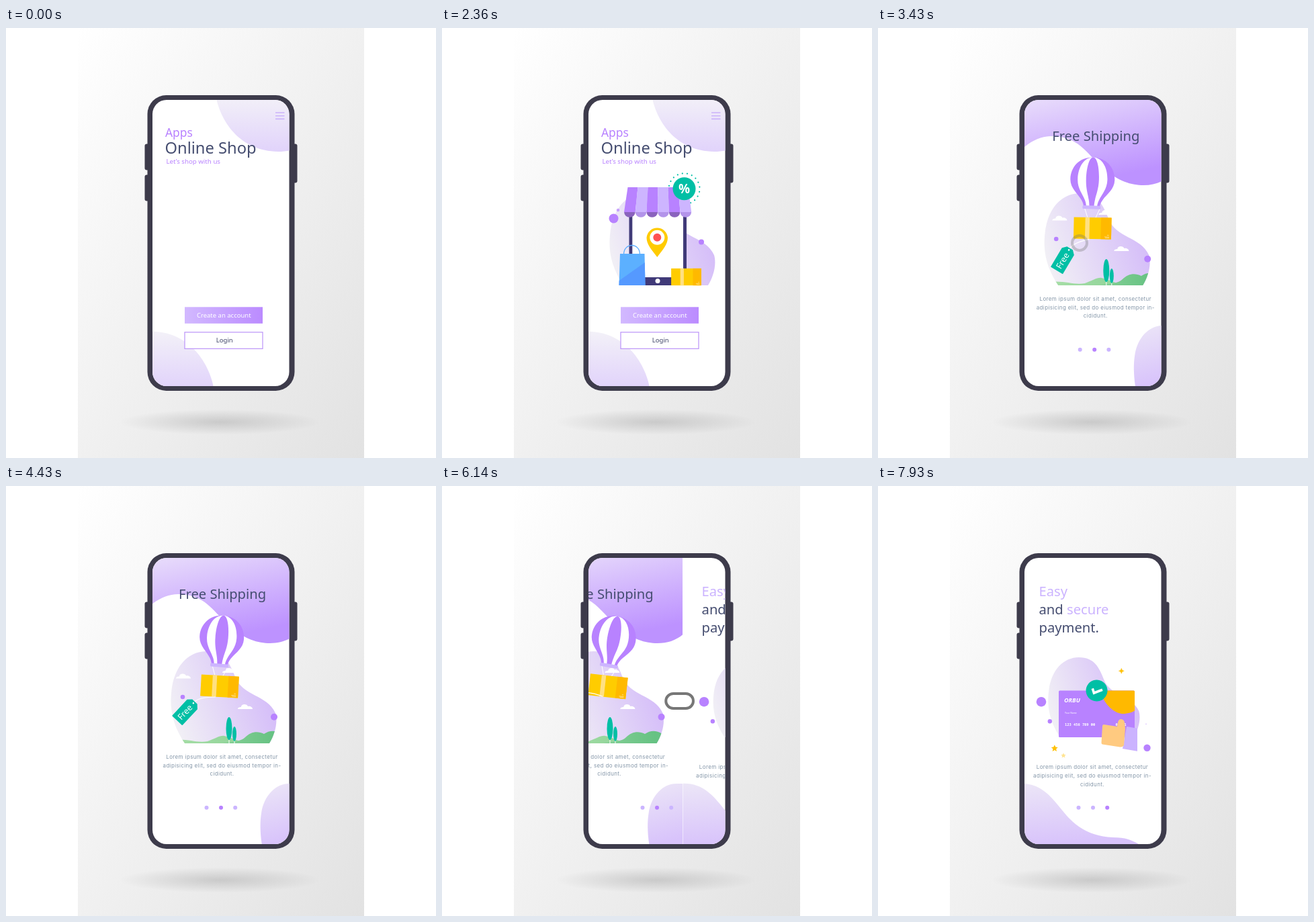
Animation of 640x640 px, one loop 8000 ms. Source, as an HTML page:

```html
<!DOCTYPE html>
<html lang="en">
<head>
<meta charset="utf-8">
<title>Online shop onboarding</title>
<style>
  html, body { margin: 0; width: 100%; height: 100%; overflow: hidden; background: #fff; }
  svg { display: block; width: 100%; height: 100%; }
  text { font-family: "Noto Sans", "Open Sans", sans-serif; }
  .head { font-size: 20.2px; font-weight: 500; fill: #454d70; }
  .soft { fill: #cbb3ff; }
  .small { font-size: 9.5px; font-weight: 500; text-anchor: middle; }
  .lorem text { font: 8px Inter, "Open Sans", sans-serif; letter-spacing: .36px; fill: #8496a8; text-anchor: middle; }
  .purple { fill: #b882ff; }
  .teal { fill: #00bfa5; }
  .white { fill: #fff; }
</style>
</head>
<body>
<svg viewBox="0 0 640 640">
  <defs>
    <linearGradient id="backdrop" x2="1" y2="1"><stop stop-color="#fff"/><stop offset="1" stop-color="#e2e2e2"/></linearGradient>
    <radialGradient id="shade"><stop stop-color="#000" stop-opacity=".14"/><stop offset=".5" stop-color="#000" stop-opacity=".07"/><stop offset="1" stop-color="#000" stop-opacity="0"/></radialGradient>
    <linearGradient id="pale" x2="0" y2="1"><stop stop-color="#f3f1f8"/><stop offset="1" stop-color="#e1d3fb"/></linearGradient>
    <linearGradient id="mid" x2=".15" y2="1"><stop stop-color="#ece6f7"/><stop offset="1" stop-color="#d8c3fb"/></linearGradient>
    <linearGradient id="sky" x2=".35" y2="1"><stop stop-color="#ebe1fb"/><stop offset="1" stop-color="#bd92ff"/></linearGradient>
    <linearGradient id="mist" x1="0" y1=".75" x2="1" y2=".45"><stop stop-color="#f2f1f5"/><stop offset="1" stop-color="#d3baf9"/></linearGradient>
    <linearGradient id="button"><stop stop-color="#d2b9ff"/><stop offset="1" stop-color="#bb8bff"/></linearGradient>
    <linearGradient id="grass"><stop stop-color="#a9dfa8"/><stop offset="1" stop-color="#8fd398"/></linearGradient>
    <linearGradient id="meadow"><stop stop-color="#85cf95"/><stop offset=".6" stop-color="#66c283"/></linearGradient>

    <path id="blob" d="M266 383C252 362 243 338 246 308C249 268 272 246 298 246C325 246 333 264 341 284C352 313 388 310 401 338C405 352 400 370 392 383Z"/>
    <path id="envelope" d="M0-33C20-33 33-18 33 0C33 18 14 25 12 40H-12C-14 25-33 18-33 0C-33-18-20-33 0-33Z"/>
    <path id="cloud" d="M-11 3C-11 0-7 0-6 0C-6-5 3-5 4-1C7-2 11 0 11 3Z" fill="#fff"/>
    <path id="star" d="M0-5L1.5-1.7L5-1.4L2.4 1L3.1 4.6L0 2.7L-3.1 4.6L-2.4 1L-5-1.4L-1.5-1.7Z"/>
    <path id="spark" d="M0-4Q.5-.5 4 0Q.5.5 0 4Q-.5.5-4 0Q-.5-.5 0-4Z" stroke="#ffc107" stroke-width=".5"/>
    <g id="parcel">
      <rect x="-28" y="-16" width="56" height="32" fill="#ffcc00"/>
      <rect x="-11" y="-16" width="6.5" height="32" fill="#ffe082"/>
      <rect x="12.500" y="-16" width="15.500" height="32" fill="#ffb900"/>
      <path d="M18 12.500h7M19 14h6M22 10h2.500" stroke="#ffe9b0" stroke-width=".7"/>
    </g>
    <g id="lorem" class="lorem">
      <text x="321.500" y="405.800">Lorem ipsum dolor sit amet, consectetur</text>
      <text x="321.500" y="418.500">adipisicing elit, sed do eiusmod tempor in-</text>
      <text x="321.500" y="431.200">cididunt.</text>
    </g>
    <clipPath id="screen"><rect x="218" y="107" width="203.500" height="426" rx="21"/></clipPath>
    <clipPath id="page"><rect x="211.500" y="100" width="219" height="440"/></clipPath>
    <clipPath id="inBlob"><use href="#blob"/></clipPath>
    <clipPath id="inCard"><rect x="269" y="304.500" width="113" height="69.500" rx="1.500"/></clipPath>
    <clipPath id="inScene"><rect x="220" y="230" width="166" height="190"/></clipPath>
  </defs>

  <rect width="640" height="640" fill="#fff"/>
  <rect x="107" width="426" height="640" fill="url(#backdrop)"/>
  <ellipse cx="318" cy="586.500" rx="150" ry="19" fill="url(#shade)"/>
  <g fill="#3d3b4b">
    <rect x="206.500" y="172.500" width="10" height="39" rx="3"/>
    <rect x="206.500" y="218.500" width="10" height="39" rx="3"/>
    <rect x="424" y="172.500" width="9.500" height="58" rx="3"/>
    <rect x="210.500" y="100" width="219" height="440" rx="28"/>
  </g>
  <rect x="218" y="107" width="203.500" height="426" rx="21" fill="#fff"/>

  <g clip-path="url(#screen)">
    <g id="home" clip-path="url(#page)">
      <path d="M312 100C318 135 345 183 405 184C416 184 424 182 431 181V100Z" fill="url(#pale)"/>
      <path d="M210 452C265 448 300 490 309 535H210Z" fill="url(#pale)"/>
      <path d="M401 126h13.500M401 130.700h13.500M401 135.400h13.500" stroke="#cbb3fb" stroke-width="1.600"/>
      <text class="purple" x="237" y="161.500" font-size="17.400">Apps</text>
      <text x="236.500" y="187" font-size="23.700" font-weight="500" fill="#454d70">Online Shop</text>
      <text class="purple" x="238.500" y="201.800" font-size="9.700">Let’s shop with us</text>

      <g id="homeBlob"><use href="#blob" x="4" fill="url(#mist)"/></g>
      <g id="homeDots" class="purple">
        <circle cx="255.500" cy="283.500" r="7"/><circle cx="262" cy="271" r="2.300" opacity=".7"/><circle cx="386" cy="318.500" r="4"/>
      </g>
      <g id="ring" class="teal"></g>
      <g id="store">
        <rect x="278.500" y="262" width="85.500" height="121" fill="#403a78"/>
        <rect x="283.300" y="262" width="75.700" height="109" fill="#fff"/>
        <circle cx="321" cy="376.500" r="3.500" fill="#fff"/>
        <g id="awning"></g>
      </g>
      <g id="pin">
        <path d="M320.300 341C312 330 304.500 322 304.500 312A15.800 15.800 0 0 1 336 312C336 322 328.500 330 320.300 341Z" fill="#ffcb00"/>
        <circle cx="320.300" cy="311.800" r="11" fill="#fff"/><circle cx="320.300" cy="311.800" r="6" fill="#ff5252"/>
      </g>
      <g id="bag">
        <path d="M270.500 337C270.500 319 294.500 319 294.500 337" fill="none" stroke="#5cadff" stroke-width="1.300"/>
        <path d="M265 336H301.500L302.500 383H263.500Z" fill="#5cb0ff"/>
        <path d="M263.700 376L301.800 349L302.500 383H263.500Z" fill="#5599ff"/>
      </g>
      <g id="gift"><use href="#parcel" transform="translate(363.500 370.500) scale(.8 .79)"/></g>
      <g id="badge">
        <circle class="teal" cx="360.500" cy="239.300" r="17"/>
        <text class="white" x="360.500" y="246.300" font-size="19" font-weight="800" text-anchor="middle">%</text>
      </g>

      <rect x="266" y="415.300" width="116" height="24.500" fill="url(#button)"/>
      <text class="small white" x="324.300" y="431">Create an account</text>
      <rect x="266" y="452.800" width="116" height="24.500" fill="#fff" stroke="#bb93f8" stroke-width="1.200"/>
      <text class="small" x="325.300" y="468.200" fill="#3f4468">Login</text>
    </g>

    <g id="shipping" clip-path="url(#page)">
      <path d="M210 182C228 165 245 160 262 161C300 164 310 190 335 210C355 228 375 234 393 234C408 234 420 230 431 221V100H210Z" fill="url(#sky)"/>
      <path d="M381 535C378 515 378 500 380 487C384 460 402 443 421 443L431 443V535Z" fill="url(#mid)"/>
      <text class="head" x="257" y="167.500">Free Shipping</text>
      <use href="#blob" fill="url(#mist)"/>
      <g clip-path="url(#inBlob)">
        <g id="hills">
          <path d="M240 383V379C270 374 280 383 300 380C312 376 318 371 325 372C335 374 345 380 360 383Z" fill="url(#grass)"/>
          <path d="M322 383C340 380 350 380 356 374C364 366 374 364 384 369C392 364 400 363 410 369C425 376 430 372 450 378V383Z" fill="url(#meadow)"/>
          <path d="M332 370V383M340 372V383" stroke="#fff"/>
          <ellipse class="teal" cx="332" cy="361" rx="4.500" ry="17"/><ellipse class="teal" cx="340" cy="369" rx="3" ry="11"/>
        </g>
      </g>
      <g id="clouds">
        <use href="#cloud" x="264" y="283.500"/><use href="#cloud" x="333" y="275"/><use href="#cloud" x="356" y="329"/>
      </g>
      <circle class="purple" cx="263" cy="314" r="3.300"/><circle class="purple" cx="399" cy="343.800" r="5"/>
      <g id="balloon">
        <g transform="translate(314.500 225.500)">
          <path d="M-10 44L-5 58M12 44L6 58" stroke="#fff"/>
          <use href="#envelope" class="purple"/>
          <use href="#envelope" class="white" transform="scale(.67 1)"/>
          <use href="#envelope" class="purple" transform="scale(.29 1)"/>
          <rect x="-13.500" y="39" width="27" height="5" rx="1.500" fill="#cdb5ff"/>
        </g>
      </g>
      <g id="cargo"><use href="#parcel" x="316.500" y="298"/></g>
      <g id="tag">
        <path d="M281 321Q288 314 312 314" fill="none" stroke="#fff" stroke-width="1.200"/>
        <g transform="translate(267 336) rotate(-47)">
          <path class="teal" d="M-17-10.500H15L20.500-5V5L15 10.500H-17Q-18 10.500-18 9.500V-9.500Q-18-10.500-17-10.500Z"/>
          <circle class="white" cx="17.500" r="1.300"/>
          <text class="white" x="-1" y="4.500" font-size="12.500" text-anchor="middle">Free</text>
        </g>
      </g>
      <use href="#lorem"/>
    </g>

    <g id="payment" clip-path="url(#page)">
      <path d="M209 443C240 441 256 460 272 480C290 503 310 521 350 523C370 523 380 528 391 535H209Z" fill="url(#mid)"/>
      <text class="head soft" x="239.500" y="164">Easy</text>
      <text class="head" x="239.500" y="191">and <tspan class="soft">secure</tspan></text>
      <text class="head" x="239.500" y="217.500">payment.</text>
      <g id="payBlob"><use href="#blob" fill="url(#mist)"/></g>
      <g class="purple">
        <circle cx="243" cy="321.200" r="7.300"/><circle cx="255.800" cy="350.300" r="3.200"/>
        <circle cx="400.500" cy="389.800" r="5.200"/><circle cx="399" cy="354.300" r=".8" opacity=".6"/>
      </g>
      <g id="card">
        <rect class="purple" x="269" y="304.500" width="113" height="69.500" rx="1.500"/>
        <path d="M329 300C335 325 352 340 367 339C375 338 380 336 386 332V300Z" fill="#ffb900" clip-path="url(#inCard)"/>
        <g class="white">
          <text x="277" y="322" font-size="9" font-weight="800" font-style="italic">ORBU</text>
          <text x="278" y="339" font-size="3.400">Your Name</text>
          <g font-size="5.400" font-weight="700" style="white-space:pre">
            <text x="278" y="357" style="font-family:'Noto Sans Mono',monospace">123 456 789 00</text>
            <text x="353.500" y="357" style="font-family:'Noto Sans Mono',monospace">01/01</text>
          </g>
        </g>
      </g>
      <g clip-path="url(#inScene)"><g id="hand">
        <path d="M370 358L390 361.500V395.500L364 391Z" fill="#cbb3ff"/>
        <path d="M336 355L356 358L357 352Q358 347 362 347Q367 348 367 353L368 361L366 386Q364 389 360 388.500L334 384.500Q332.500 384 332.500 382L334 357Q334.500 355 336 355Z" fill="#ffca80"/>
      </g></g>
      <g id="check">
        <circle class="teal" r="16"/>
        <path d="M-7 0L-2 5L7-5" fill="none" stroke="#fff" stroke-width="3.600"/>
      </g>
      <g id="sparks" fill="#ffc107"></g>
      <use href="#lorem" x="-2.500" y="15.600"/>
    </g>
    <g id="pager">
      <circle cx="298.500" cy="478.700" r="3"/><circle cx="320" cy="478.700" r="3"/><circle cx="341.200" cy="478.700" r="3"/>
    </g>
    <rect id="swipe" y="309" height="22" rx="11" fill="none" stroke="#777" stroke-width="4"/>
  </g>
</svg>
<script>
const LOOP = 8000, PAGE = 219.5, SWIPES = [2420, 6000];
const $ = id => document.getElementById(id);
const clamp = x => Math.min(1, Math.max(0, x));
const span = (t, from, length) => clamp((t - from) / length);
const mix = (a, b, u) => a + (b - a) * u;
const smooth = u => u * u * (3 - 2 * u);
const out = (u, power = 3) => 1 - (1 - u) ** power;
const back = u => 1 + 2.9 * (u - 1) ** 3 + 1.9 * (u - 1) ** 2;
const move = (id, value) => $(id).setAttribute("transform", value);
const fade = (id, value) => $(id).setAttribute("opacity", value);
const shift = (id, x, y = 0) => move(id, `translate(${x} ${y})`);
const scaleAt = (id, x, y, sx, sy = sx) =>
  move(id, `translate(${x} ${y}) scale(${sx} ${sy}) translate(${-x} ${-y})`);

const sparks = [
  { shape: "spark", x: 240, y: 298, from: 6550, length: 800 },
  { shape: "spark", x: 362.300, y: 275.300, from: 7600, length: 700 },
  { shape: "star", x: 262.800, y: 390.300, from: 7650, length: 600 },
  { shape: "star", x: 276, y: 401, from: 7860, length: 600 }
];

function build() {
  let stripes = "";
  for (let i = 0; i < 6; i++) {
    const edge = n => [276.500 + n * 15, 271 + n * 16.700];
    const [a, b] = edge(i), [c, d] = edge(i + 1);
    const [top, scallop] = i % 2 ? ["#cdb5ff", "#b394ea"] : ["#b882ff", "#8a63bd"];
    stripes += `<path d="M${b} 273.500A8.350 8.350 0 0 0 ${d} 273.500Z" fill="${scallop}"/>
      <path d="M${a} 237H${c}L${d} 274H${b}Z" fill="${top}"/>`;
  }
  $("awning").innerHTML = stripes;

  let ring = "";
  for (let i = 0; i < 20; i++) {
    const angle = i * Math.PI / 10;
    ring += `<circle cx="${23 * Math.cos(angle)}" cy="${23 * Math.sin(angle)}" r="1.100"/>`;
  }
  $("ring").innerHTML = ring;
  $("sparks").innerHTML = sparks.map((s, i) => `<use id="spark${i}" href="#${s.shape}"/>`).join("");
}

function drawHome(t) {
  const rise = out(span(t, 60, 420));
  const pop = back(span(t, 400, 420));
  fade("homeBlob", span(t, 50, 250));
  scaleAt("homeBlob", 325, 383, mix(.96, 1, out(span(t, 50, 1500))));
  fade("homeDots", span(t, 300, 250));
  fade("store", span(t, 30, 100));
  scaleAt("store", 321, 383, 1, rise);
  scaleAt("pin", 320, 341, Math.max(0, back(span(t, 330, 400))));
  shift("bag", -31 * (1 - out(span(t, 250, 500))));
  fade("bag", span(t, 250, 200));
  shift("gift", 35 * (1 - out(span(t, 300, 500))));
  fade("gift", span(t, 300, 200));
  scaleAt("badge", 360.500, 239.300, Math.max(0, pop));
  move("ring", `translate(360.500 239.300) rotate(${t * .02}) scale(${Math.max(0, pop)})`);
}

function drawShipping(t) {
  const dt = t - 4430;
  shift("hills", -.0056 * dt);
  shift("clouds", -.0042 * dt);
  move("balloon", `rotate(${.003 * (t - 2790)} 316 303)`);
  move("cargo", `rotate(${.0019 * (t - 2790)} 316.500 298) translate(${.0009 * (t - 2790)})`);
  move("tag", `rotate(${.0122 * dt} 314 313)`);
}

function drawPayment(t) {
  const size = .868 * mix(.95, 1, out(span(t, 6300, 1400), 2));
  move("payBlob", `translate(321 374) scale(${size}) translate(-323.500 -383)`);
  shift("card", 60 * (1 - out(span(t, 6450, 650), 2)));
  fade("card", span(t, 6500, 360));
  shift("hand", 56 * (1 - out(span(t, 7200, 480))), 12 * (1 - out(span(t, 7200, 480))));
  const pop = Math.max(0, back(span(t, 7500, 350)));
  move("check", `translate(325.500 304.500) scale(${pop}) rotate(${mix(90, 27, out(span(t, 7500, 450)))})`);
  sparks.forEach((s, i) => {
    const glow = Math.sin(Math.PI * span(t, s.from, s.length));
    move("spark" + i, `translate(${s.x} ${s.y}) scale(${mix(.6, 1, glow)})`);
    fade("spark" + i, Math.min(1, glow * 1.200));
  });
}

function drawSwipe(t) {
  const dt = t - (t < SWIPES[1] ? SWIPES[0] : SWIPES[1]);
  const left = mix(363, 300, smooth(span(dt, 0, 390)));
  const right = mix(363, 300, smooth(span(dt, 300, 640)));
  const pill = $("swipe");
  pill.setAttribute("x", left - 11);
  pill.setAttribute("width", right - left + 22);
  fade("swipe", Math.min(span(dt, 0, 90), 1 - span(dt, 920, 140)));
}

function draw(t) {
  const [first, second] = SWIPES.map(start => out(span(t, start, 1480), 4));
  const scroll = PAGE * (first + second);
  ["home", "shipping", "payment"].forEach((id, i) => shift(id, i * PAGE - scroll));
  shift("pager", PAGE * (1 - first));
  const active = t < 6400 ? 1 : 2;
  [...$("pager").children].forEach((dot, i) => dot.setAttribute("fill", i === active ? "#b882ff" : "#cbb5ff"));
  drawHome(t);
  drawShipping(t);
  drawPayment(t);
  drawSwipe(t);
}

build();
const start = performance.now();
function tick() {
  draw((performance.now() - start) % LOOP);
  requestAnimationFrame(tick);
}
tick();
</script>
</body>
</html>
```
